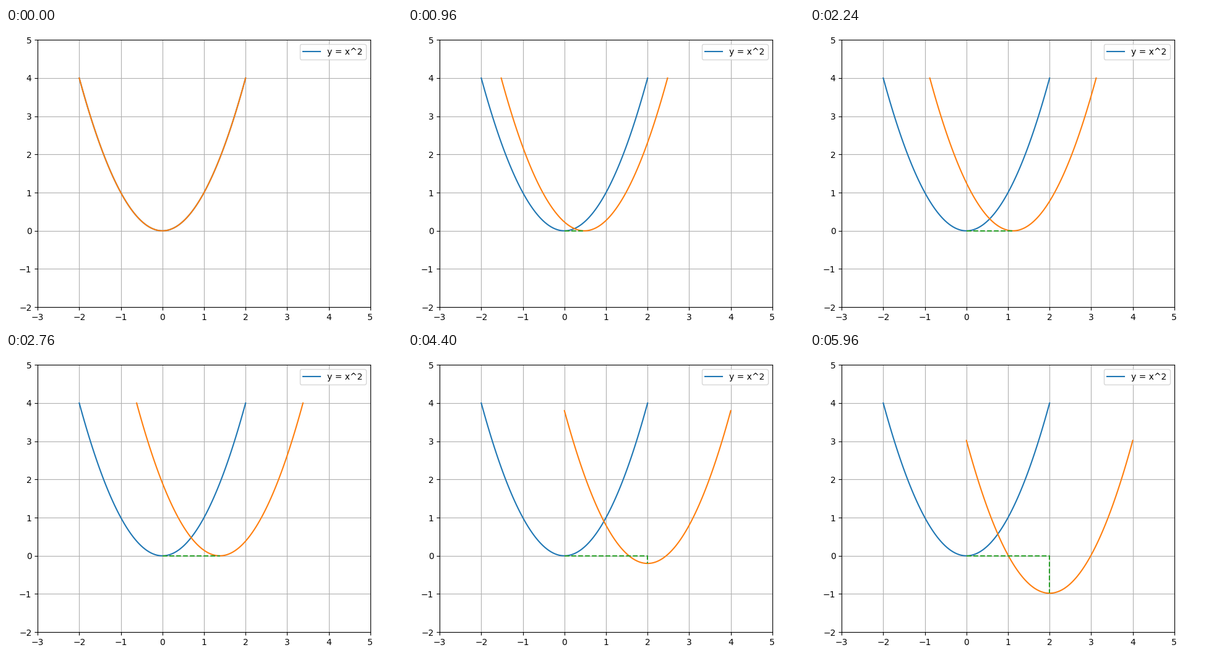
A matplotlib script for the animation above (6 s loop, 640 by 480 pixels).

```python
import numpy as np
import matplotlib.pyplot as plt
from matplotlib.animation import FuncAnimation

FRAMES = 150
INTERVAL = 40   # ms
STEP = 0.02     # units moved per frame
SHIFT_X = 2.0   # rightward travel before the curve turns downward

fig, ax = plt.subplots(figsize=(6.4, 4.8), dpi=100)
fig.subplots_adjust(left=0.08, right=0.92, bottom=0.06, top=0.96)
ax.set(xlim=(-3, 5), ylim=(-2, 5))
ax.grid(True)

x = np.linspace(-2, 2, 100)
y = x ** 2
ax.plot(x, y, label="y = x^2")
moving, = ax.plot(x, y)
trail, = ax.plot([], [], "--")
ax.legend(loc="upper right")


def update(frame):
    travel = STEP * frame
    dx = min(travel, SHIFT_X)
    dy = -max(travel - SHIFT_X, 0)
    moving.set_data(x + dx, y + dy)
    path = [(0, 0), (dx, 0)]
    if dy < 0:
        path.append((dx, dy))
    trail.set_data(*zip(*path))
    return moving, trail


anim = FuncAnimation(fig, update, frames=FRAMES, interval=INTERVAL,
                     repeat=True, repeat_delay=0)
plt.show()
```
